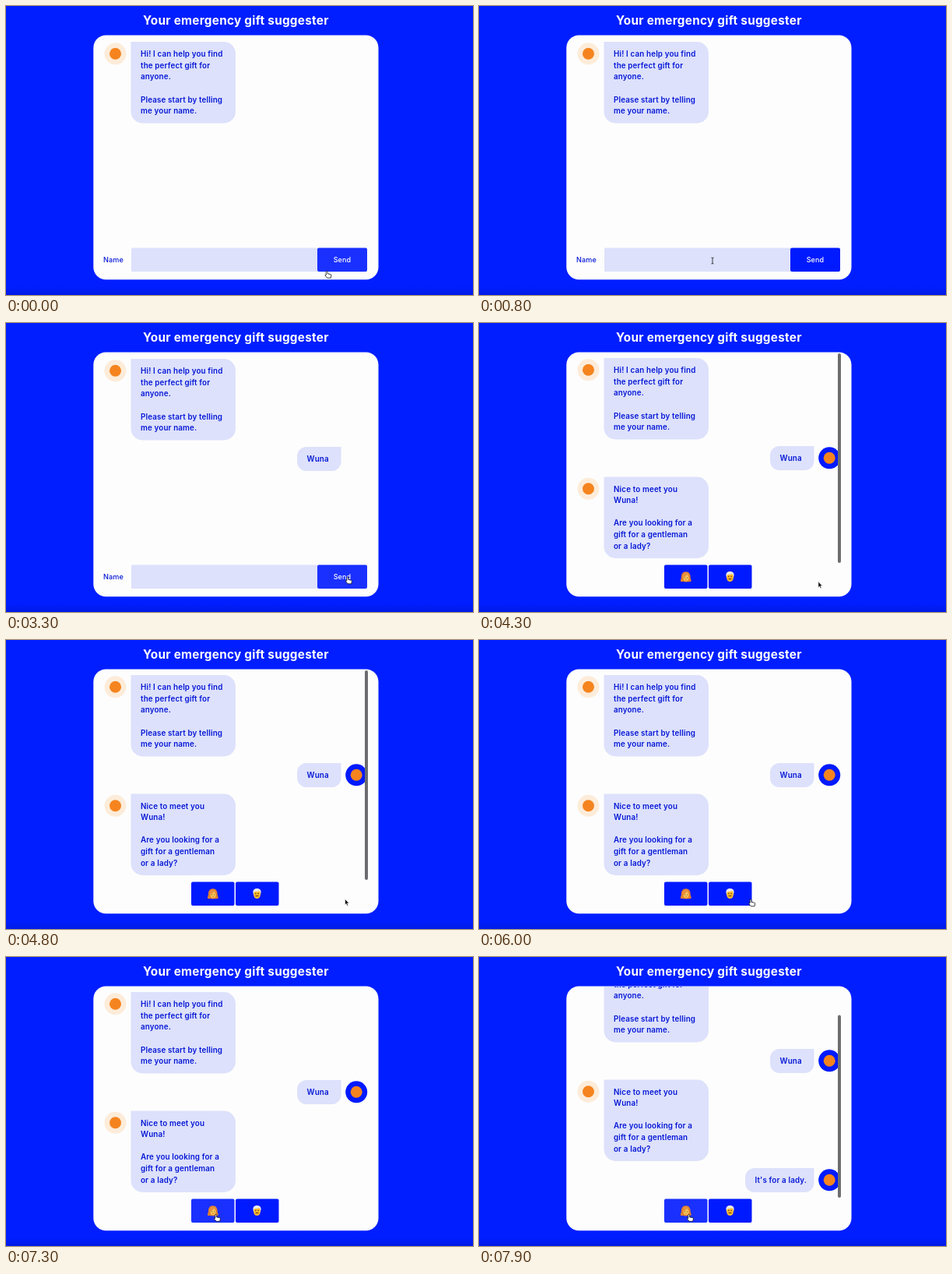
An HTML page for the animation above (8000 ms loop, 600 by 371 pixels).

```html
<!DOCTYPE html>
<html lang="en">
<head>
<meta charset="utf-8">
<title>Gift suggester</title>
<style>
  html, body { margin: 0; width: 100%; height: 100%; overflow: hidden; background: #001eff; }
  svg { display: block; width: 100vw; height: 100vh; }
  text { font-family: Inter, "Open Sans", sans-serif; font-weight: 600; font-size: 9.8px; letter-spacing: .15px; fill: #0517d6; }
  .title { font-size: 15.3px; font-weight: 700; letter-spacing: .28px; fill: #fff; }
  .label { font-size: 9.1px; font-weight: 500; }
  .send { font-size: 9px; font-weight: 500; fill: #fff; text-anchor: middle; }
  .typed { font-size: 8.9px; letter-spacing: 0; }
  .option { font: 7px "Liberation Sans", Arial, sans-serif; letter-spacing: 0; fill: #111; }
  .bubble, .field { fill: #dde1fb; }
</style>
</head>
<body>
<svg viewBox="0 0 600 371" preserveAspectRatio="none">
  <defs>
    <clipPath id="view"><path d="M112 309V54a16 16 0 0 1 16-16H462a16 16 0 0 1 16 16V309z"/></clipPath>
    <linearGradient id="page" x2="0" y2="1">
      <stop offset=".97" stop-color="#001eff"/><stop offset="1" stop-color="#001be6"/>
    </linearGradient>
    <filter id="shadow" x="-20%" y="-20%" width="140%" height="150%">
      <feDropShadow dx="0" dy="1" stdDeviation="1" flood-opacity=".35"/>
    </filter>
  </defs>
  <rect width="600" height="371" fill="url(#page)"/>
  <text class="title" x="176" y="24">Your emergency gift suggester</text>
  <rect x="112.3" y="37.6" width="366.2" height="313.7" rx="16" fill="#fdfdfd"/>

  <g clip-path="url(#view)"><g id="chat"></g></g>
  <rect id="bar" x="461" width="4" rx="2" fill="#6d6d70"/>

  <g id="form">
    <text class="label" x="125" y="329">Name</text>
    <rect class="field" x="161" y="310.5" width="239.5" height="30.5" rx="1.5"/>
    <rect id="focus" x="161" y="310.5" width="239.5" height="30.5" rx="1.5" fill="none" stroke="#1450b4" stroke-width="1.2"/>
    <text id="typed" class="typed" x="169" y="329"></text>
    <path id="caret" stroke="#111" stroke-width=".8"/>
    <g id="popup">
      <path d="M214.5 264h78.500a2 2 0 0 1 2 2v38.500a2 2 0 0 1-2 2H228l-4.500 3.500-4.500-3.500h-4.500a2 2 0 0 1-2-2V266a2 2 0 0 1 2-2z" fill="#fff" filter="url(#shadow)"/>
      <text class="option" x="219" y="278.5">Wuna</text>
      <text class="option" x="219" y="297.5">wuna</text>
    </g>
    <rect id="send" x="400" y="310.5" width="64" height="30.5" rx="2"/>
    <text class="send" x="432" y="329">Send</text>
  </g>

  <g id="choice">
    <rect id="lady" x="238" y="310.4" width="55.5" height="30.7" rx="2"/>
    <rect id="gent" x="295" y="310.4" width="55.5" height="30.7" rx="2"/>
    <g transform="translate(265.8 325.7)">
      <path d="M0-6.500C-4.500-6.500-5.800-3-5.800 0-5.800 3-7.300 4-6.800 5.800-5 7 5 7 6.800 5.800 7.300 4 5.800 3 5.800 0 5.800-3 4.500-6.500 0-6.500z" fill="#e07f2c"/>
      <ellipse cx=".3" cy="1.200" rx="3.500" ry="4.400" fill="#fbc75a"/>
      <path d="M-4 1.500C-2 .500 1-1 1.500-3.500 2-1.500 3-.500 4 1 4.500-4 2-5.500 0-5.500S-4.500-3-4 1.500z" fill="#e89040"/>
      <circle cx="-1.200" cy="1.300" r=".6" fill="#55300c"/><circle cx="1.800" cy="1.300" r=".6" fill="#55300c"/>
      <path d="M-1 3.400Q.3 4.700 1.600 3.400z" fill="#c7332c"/>
    </g>
    <g transform="translate(322.5 325.5)">
      <path d="M-5-1C-5.500-5-3-6.500 0-6.500S5.500-5 5-1L4.300 2H-4.300z" fill="#eeece6"/>
      <path d="M-4.200-1C-3-3.500 1-2 3-3.500L4.200-1V2C4.200 5 2 6.500 0 6.500S-4.200 5-4.200 2z" fill="#fbb92e"/>
      <circle cx="-1.700" cy="0" r=".7" fill="#55300c"/><circle cx="1.700" cy="0" r=".7" fill="#55300c"/>
      <path d="M-2.500 3.300Q-1 2 0 2.500 1 2 2.500 3.300 1 4 0 3.500-1 4-2.500 3.300z" fill="#7a4516"/>
    </g>
  </g>

  <g id="cursor" stroke-linejoin="round">
    <path id="hand" transform="translate(-1.7 -.3)" d="M-1 .6Q-.9-.4 0-.3T.9.800V3.200L4.700 4Q5.800 4.300 5.600 5.400L4.900 8.600H.4L-2.300 5.500Q-2.600 4.300-1 4.700z" fill="#fff" stroke="#111" stroke-width=".8"/>
    <path id="arrow" d="M0 0V7.500L1.700 6 2.900 8.800 4.200 8.200 3 5.500H5.300z" fill="#111" stroke="#fff" stroke-width=".6"/>
    <path id="beam" d="M-1.500-4Q0-4 0-3V3Q0 4-1.500 4M1.500-4Q0-4 0-3M0 3Q0 4 1.500 4" fill="none" stroke="#111" stroke-width=".8"/>
  </g>
</svg>
<script>
const LOOP = 8000, NAME = 'Wuna', START = performance.now();
const TOP = 39, VIEW = 270;
const $ = id => document.getElementById(id);
const show = (el, on) => el.setAttribute('visibility', on ? 'inherit' : 'hidden');
const clamp = x => Math.min(1, Math.max(0, x));
const ease = x => x * x * (3 - 2 * x);
const ramp = (t, a, b) => ease(clamp((t - a) / (b - a)));

function add(parent, tag, attrs, text) {
  const el = document.createElementNS('http://www.w3.org/2000/svg', tag);
  for (const k in attrs) el.setAttribute(k, attrs[k]);
  if (text) el.textContent = text;
  return parent.appendChild(el);
}

// Bubble with one square top corner on the avatar's side.
function bubblePath(x, y, w, h, r, mine) {
  const tl = mine ? r : 0, tr = mine ? 0 : r;
  return `M${x + tl} ${y}H${x + w - tr}a${tr} ${tr} 0 0 1 ${tr} ${tr}V${y + h - r}` +
    `a${r} ${r} 0 0 1 ${-r} ${r}H${x + r}a${r} ${r} 0 0 1 ${-r} ${-r}V${y + tl}a${tl} ${tl} 0 0 1 ${tl} ${-tl}z`;
}

function message(y, x, w, lines, mine) {
  const g = add($('chat'), 'g', {});
  const h = lines.length > 1 ? 104.5 : 31;
  add(g, 'path', { class: 'bubble', d: bubblePath(x, y, w, h, mine ? 12 : 15, mine) });
  lines.forEach((line, i) => add(g, 'text', { x: x + 12.5, y: y + 19 + i * 14.65 }, line));
  const face = add(g, 'g', { transform: `translate(${mine ? 450.2 : 140.5} ${y + 15.3})` });
  add(face, 'circle', { r: 14, fill: mine ? '#001aff' : '#fdecd9' });
  add(face, 'circle', { r: 7.5, fill: '#f5841f' });
  return { g, face };
}

message(46, 160.5, 134.5, ['Hi! I can help you find', 'the perfect gift for', 'anyone.', '',
  'Please start by telling', 'me your name.']);
const nameMsg = message(159, 374, 56.5, [NAME], true);
const reply = message(198.5, 160.5, 134.5, ['Nice to meet you', NAME + '!', '',
  'Are you looking for a', 'gift for a gentleman', 'or a lady?']);
const answer = message(312, 342, 88.5, ["It's for a lady."], true);

// Pointer stops: time, x, y
const stops = [
  [0, 414, 340.8], [100, 414, 340.8], [800, 300, 327], [2400, 300, 327], [2800, 508, 333],
  [3150, 440.5, 326.5], [3800, 440.5, 326.5], [4400, 435.5, 332.5], [5100, 435.5, 332.5],
  [5600, 400, 336], [6000, 350.8, 333.5], [6600, 308, 328], [7200, 271.5, 331], [LOOP, 271.5, 331]
];

function pointer(t) {
  let i = 0;
  while (i < stops.length - 2 && t >= stops[i + 1][0]) i++;
  const [a, x, y] = stops[i], [b, u, v] = stops[i + 1], k = ramp(t, a, b);
  return [x + (u - x) * k, y + (v - y) * k];
}

const inside = ([x, y], left, right) => x >= left && x <= right && y >= 310 && y <= 341;

function draw(t) {
  const asking = t >= 4300;
  const p = pointer(t);
  const paint = (id, left, right) =>
    $(id).setAttribute('fill', inside(p, left, right) ? '#1a30ff' : '#001aff');

  // Conversation and its scroll
  show(nameMsg.g, t >= 3300);
  show(nameMsg.face, t >= 3700);
  show(reply.g, t >= 4200);
  show(answer.g, t >= 7700);
  show(answer.face, t >= 7800);
  const scroll = (t >= 4200 ? 1 : 0) + 40 * ramp(t, 7650, 7900);
  $('chat').setAttribute('transform', `translate(0 ${-scroll})`);
  const thumb = VIEW * VIEW / (VIEW + (t >= 7700 ? 41 : 1));
  $('bar').setAttribute('height', thumb);
  $('bar').setAttribute('y', t >= 7700 ? TOP + (VIEW - thumb) * scroll / 41 : TOP);
  const fadeOut = 1 - clamp((t - 5000) / 300);
  $('bar').setAttribute('opacity', t >= 7700 ? 1 : t >= 4200 ? fadeOut : 0);

  // Name form
  const focused = t >= 900 && t < 3300;
  const count = focused ? Math.min(4, Math.max(0, Math.floor((t - 1050) / 150))) : 0;
  show($('form'), !asking);
  show($('focus'), focused);
  $('typed').textContent = NAME.slice(0, count);
  show($('popup'), count > 0 && t < 3150);
  const cx = 169.6 + (count ? $('typed').getComputedTextLength() : 0);
  $('caret').setAttribute('d', `M${cx} 320.5V331`);
  show($('caret'), focused && (t < 2200 || t % 1000 < 500));

  // Buttons and pointer
  show($('choice'), asking);
  paint('send', 400, 464);
  paint('lady', 238, 293.5);
  paint('gent', 295, 350.5);
  const hand = asking ? inside(p, 238, 351) : inside(p, 400, 464);
  const beam = !asking && inside(p, 161, 399.99);
  $('cursor').setAttribute('transform', `translate(${p[0]} ${p[1]})`);
  show($('cursor'), t < 1100 || t >= 2400);
  show($('hand'), hand);
  show($('beam'), beam);
  show($('arrow'), !hand && !beam);
}

function tick() {
  draw((performance.now() - START) % LOOP);
  requestAnimationFrame(tick);
}
tick();
</script>
</body>
</html>
```
